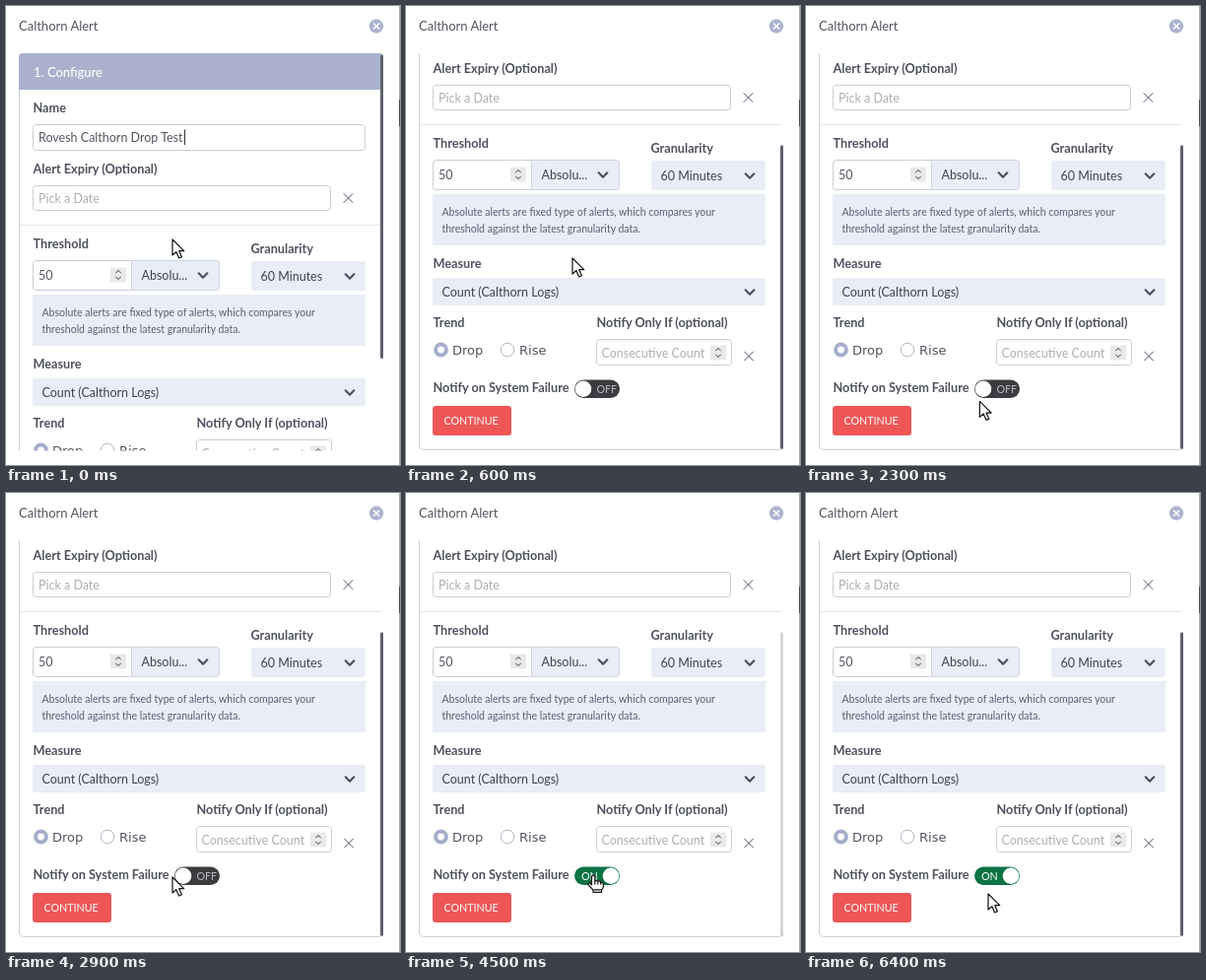
These frames come from a looping animation (400x466 px, 6500 ms). An HTML page:

```html
<!DOCTYPE html>
<html lang="en">
<head>
<meta charset="utf-8">
<title>Alert form</title>
<style>
html, body { margin: 0; width: 100%; height: 100%; overflow: hidden; background: #fff; }
svg { display: block; width: 100%; height: 100%; }
text { font: 12.5px Lato, sans-serif; fill: #53565f; white-space: pre; }
.title { font-size: 13px; }
.label { font-size: 12.7px; font-weight: 700; fill: #4e525e; }
.hint { fill: #adafb3; }
.pick { fill: #40444f; }
.note { font-size: 10.5px; fill: #586074; }
.radio { font: 13px "DejaVu Sans", sans-serif; fill: #50545f; }
.small { font-size: 10.7px; fill: #fff; }
.input { fill: #fff; stroke: #cbccd2; }
.soft { fill: #e9edf5; }
.line { fill: none; stroke: #4a5163; }
</style>
</head>
<body>
<svg viewBox="0 0 400 466">
  <defs>
    <clipPath id="view"><rect y="48" width="383" height="403.5"/></clipPath>
    <path id="chevron" class="line" d="M-4.3 -2.2L0 2.2L4.3 -2.2" stroke-width="2.2" stroke-linecap="round" stroke-linejoin="round"/>
    <path id="cross" class="line" d="M-4.7 -4.7L4.7 4.7M4.7 -4.7L-4.7 4.7"/>
    <g id="spinner">
      <rect width="16" height="15" rx="1" fill="#e9e9ea"/>
      <path class="line" d="M5.3 5.6L8 3L10.7 5.6M5.3 9.4L8 12L10.7 9.4" style="stroke:#777a80" stroke-width="1.2"/>
    </g>
  </defs>
  <rect width="400" height="466" fill="#fff"/>
  <path d="M399.5 0V466" stroke="#a9aaaf"/>
  <path d="M399.5 95V122" stroke="#4a4b50"/>
  <text class="title" x="13" y="25">Calthorn Alert</text>
  <circle cx="376" cy="20.5" r="7.2" fill="#adb4cf"/>
  <path d="M373 17.5L379 23.5M379 17.5L373 23.5" stroke="#fff" stroke-width="1.5"/>

  <g clip-path="url(#view)">
    <g id="form">
      <rect x="13.5" y="48.5" width="370" height="504" rx="4" fill="#fff" stroke="#cdd1dc"/>
      <path d="M13 85V52Q13 48 17 48H379Q383 48 383 52V85Z" fill="#a9b1cc"/>
      <text class="title" x="28" y="72" style="fill:#fff;font-weight:500">1. Configure</text>

      <text class="label" x="27.5" y="108">Name</text>
      <rect class="input" x="27.5" y="120.5" width="337" height="26" rx="3"/>
      <text x="33" y="138">Rovesh Calthorn Drop Test</text>
      <path id="caret" d="M181.5 125.5V141" stroke="#333"/>

      <text class="label" x="27.5" y="170">Alert Expiry (Optional)</text>
      <rect class="input" x="27.5" y="182.5" width="302" height="25" rx="3"/>
      <text class="hint" x="33" y="200">Pick a Date</text>
      <use href="#cross" x="347.5" y="195"/>
      <path d="M14 222.5H382" stroke="#e6e7eb"/>

      <text class="label" x="27.5" y="246">Threshold</text>
      <rect class="input" x="27.5" y="258.5" width="102" height="30" rx="3"/>
      <text x="33" y="278">50</text>
      <use href="#spinner" x="106" y="265.5"/>
      <path class="soft" d="M127.5 258.5H213.5Q216.5 258.5 216.5 261.5V285.5Q216.5 288.5 213.5 288.5H127.5Z" stroke="#cfd3de"/>
      <text class="pick" x="137.5" y="278">Absolu...</text>
      <use href="#chevron" x="200" y="273.5"/>

      <text class="label" x="248.5" y="251">Granularity</text>
      <rect class="soft" x="249" y="259" width="116" height="30" rx="2"/>
      <text class="pick" x="258.5" y="279">60 Minutes</text>
      <use href="#chevron" x="349" y="274.5"/>

      <rect class="soft" x="27" y="293" width="338" height="52"/>
      <text class="note" x="36.5" y="315">Absolute alerts are fixed type of alerts, which compares your</text>
      <text class="note" x="36.5" y="332">threshold against the latest granularity data.</text>

      <text class="label" x="27.5" y="368">Measure</text>
      <rect class="soft" x="27" y="378" width="338" height="28" rx="2"/>
      <text class="pick" x="36.5" y="397">Count (Calthorn Logs)</text>
      <use href="#chevron" x="349" y="392.5"/>

      <text class="label" x="27.5" y="428">Trend</text>
      <circle cx="35.5" cy="451" r="5.4" fill="#fff" stroke="#a6aecb" stroke-width="4"/>
      <text class="radio" x="47" y="456">Drop</text>
      <circle cx="103" cy="451" r="6.8" fill="#fff" stroke="#b0b5c6"/>
      <text class="radio" x="115" y="456">Rise</text>

      <text class="label" x="193.5" y="428">Notify Only If (optional)</text>
      <rect class="input" x="193.5" y="440.5" width="137" height="26" rx="3"/>
      <text class="hint" x="198.5" y="459">Consecutive Count</text>
      <use href="#spinner" x="309" y="446.5"/>
      <use href="#cross" x="348" y="457.5"/>

      <text class="label" x="27.5" y="494">Notify on System Failure</text>
      <rect id="track" x="171" y="481.5" width="46" height="18.5" rx="9.25"/>
      <text id="state" class="small" y="494.5"></text>
      <circle id="knob" cy="490.75" r="8.3" fill="#fff"/>

      <rect x="27" y="508" width="80" height="30" rx="3" fill="#ee5656"/>
      <text class="small" x="38.5" y="527">CONTINUE</text>
    </g>
  </g>
  <rect id="bar" x="380" width="3" height="308.5" rx="1.5" fill="#5e6169"/>

  <path id="arrow" d="M0 0V16L3.8 12.6L6.6 19L9.4 17.8L6.7 11.7H11.7Z" fill="#fff" stroke="#111" stroke-width="1.2" stroke-linejoin="round"/>
  <g id="hand" stroke="#111" stroke-width="1.2" stroke-linejoin="round">
    <path d="M-2.5 2.5Q-.8 -.4 .8 2.5V6.6L4.6 6.8L7 7.7L9.3 9.4V13.5L7.6 16V18.3H-1V16L-5.8 10.8Q-6 8.4 -4.2 9.2L-2.5 10.8Z" fill="#fff"/>
    <path d="M.8 6.4V10.4M3.8 6.9V10.4M6.6 7.7V10.4M-.6 15.9H7.4" fill="none"/>
  </g>
</svg>
<script>
const LOOP = 6500, STEP = 100, CLICK = 4300;
const $ = id => document.getElementById(id);

// Rows: time, then values
const scrollKeys = [[200, 0], [300, 18], [400, 52], [500, 90], [600, 102]];
const barKeys = [[4200, 1], [4500, 0.25], [4700, 0], [5700, 0], [6000, 1]];
const cursorKeys = [
  [0, 169, 237], [100, 169, 256], [700, 169, 256], [1300, 200, 386], [1500, 201, 388],
  [1800, 201, 388], [2000, 199, 405], [2200, 185, 414], [2350, 172, 395], [2500, 178, 368],
  [2900, 169, 390], [3200, 179, 404], [3500, 202, 403], [3900, 191, 387], [4500, 191, 387],
  [4900, 195, 383], [5200, 199, 382], [5300, 199, 382], [5700, 196, 390], [6000, 193, 396],
  [6400, 185, 407]
];

function sample(keys, t) {
  const i = keys.findIndex(k => k[0] > t);
  if (i < 0) return keys[keys.length - 1].slice(1);
  if (i === 0) return keys[0].slice(1);
  const a = keys[i - 1], b = keys[i];
  const p = (t - a[0]) / (b[0] - a[0]);
  return a.slice(1).map((v, n) => v + (b[n + 1] - v) * p);
}

function draw(t) {
  const [scroll] = sample(scrollKeys, t);
  $("form").setAttribute("transform", `translate(0 ${-scroll})`);
  $("bar").setAttribute("y", 49.5 + scroll * 0.9);
  $("bar").setAttribute("opacity", sample(barKeys, t)[0]);
  $("caret").setAttribute("opacity", t < 300 ? 1 : 0);

  const slide = Math.max(0, Math.min(1, (t - CLICK + STEP) / 200));
  const on = slide > 0;
  $("track").setAttribute("fill", on ? "#0b7344" : "#3b3c40");
  $("knob").setAttribute("cx", 180 + 28 * slide);
  $("state").textContent = on ? "ON" : "OFF";
  $("state").setAttribute("x", on ? 178 : 193.5);
  $("state").style.fill = on ? "#fff" : "#b9bac0";

  const [x, y] = sample(cursorKeys, t);
  const top = 481 - scroll;
  const over = x >= 171 && x <= 217 && y >= top && y <= top + 19;
  for (const [id, shown] of [["arrow", !over], ["hand", over]]) {
    $(id).setAttribute("transform", `translate(${x} ${y})`);
    $(id).setAttribute("visibility", shown ? "visible" : "hidden");
  }
}

function tick() {
  const t = performance.now() % LOOP;
  draw(Math.floor(t / STEP) * STEP);
  requestAnimationFrame(tick);
}
tick();
</script>
</body>
</html>
```
